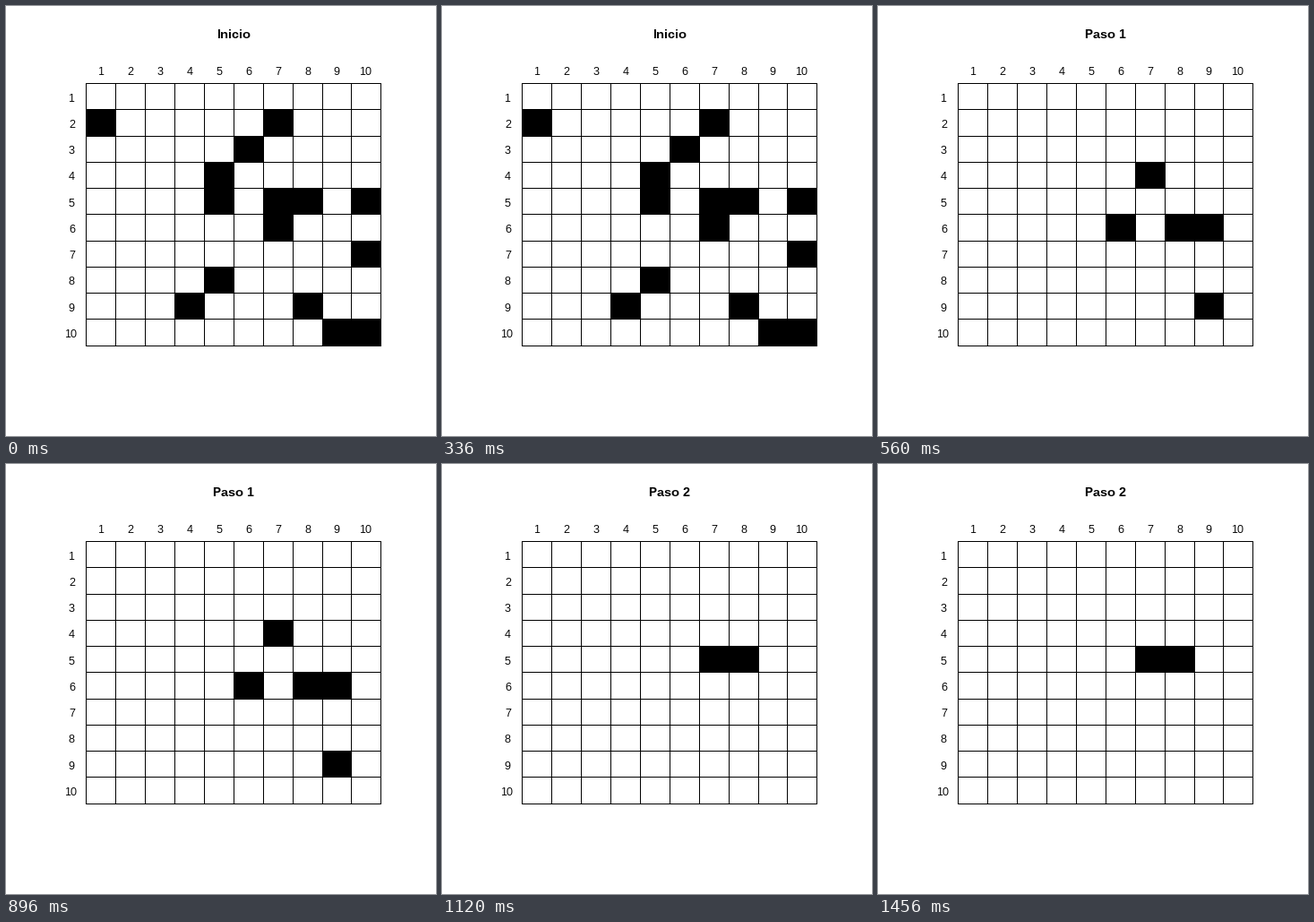
Animation, 480 px wide and 480 px high, one loop 1.68 s. Source, as a matplotlib script:

```python
import matplotlib.pyplot as plt
import numpy as np
from matplotlib.animation import FuncAnimation
from matplotlib.patches import Rectangle

plt.rcParams["font.family"] = "Liberation Sans"
plt.rcParams["text.hinting"] = "native"
plt.rcParams["text.hinting_factor"] = 1

SIZE, DPI, N, STEPS = 480, 72, 10, 3
DX, DY = 32.9, 29.27

# Pixel positions of the grid lines
XS = [int(89.85 + DX * i) for i in range(N + 1)]
YS = [int(86.5 + DY * i) for i in range(N + 1)]

# First generation, one string per row
START = """
..........
#.....#...
.....#....
....#.....
....#.##.#
......#...
.........#
....#.....
...#...#..
........##
"""

fig = plt.figure(figsize=(SIZE / DPI, SIZE / DPI), dpi=DPI, facecolor="white")
ax = fig.add_axes([0, 0, 1, 1])
ax.set_xlim(0, SIZE)
ax.set_ylim(SIZE, 0)
ax.axis("off")


def box(x0, y0, x1, y1):
    """Solid black rectangle on exact pixel edges."""
    return ax.add_patch(Rectangle((x0, y0), x1 - x0, y1 - y0, color="black",
                                  linewidth=0, antialiased=False))


def label(x, y, text, size=12, weight="normal"):
    return ax.text(x, y, text, fontsize=size, weight=weight, color="black",
                   ha="center", va="baseline")


def evolve(grid):
    """A cell is alive next if it has exactly three live neighbours."""
    pad = np.pad(grid, 1)
    around = sum(pad[r:r + N, c:c + N] for r in range(3) for c in range(3))
    return (around - grid == 3).astype(int)


def generation(step):
    grid = np.array([[ch == "#" for ch in row] for row in START.split()], int)
    for _ in range(step):
        grid = evolve(grid)
    return grid


for x in XS:
    box(x, YS[0], x + 1, YS[-1] + 1)
for y in YS:
    box(XS[0], y, XS[-1] + 1, y + 1)

for i in range(N):
    label(106.2 + DX * i, 77, str(i + 1))
    label(73.4, int(107 + DY * i), str(i + 1))

title = label(254, 36, "", 14.4, "bold")
cells = [[box(XS[c], YS[r], XS[c + 1] + 1, YS[r + 1] + 1) for c in range(N)]
         for r in range(N)]


def draw(step):
    title.set_text(f"Paso {step}" if step else "Inicio")
    grid = generation(step)
    for r in range(N):
        for c in range(N):
            cells[r][c].set_visible(bool(grid[r, c]))
    return [title]


anim = FuncAnimation(fig, draw, frames=STEPS, interval=560,
                     repeat=True, repeat_delay=0)
plt.show()
```
